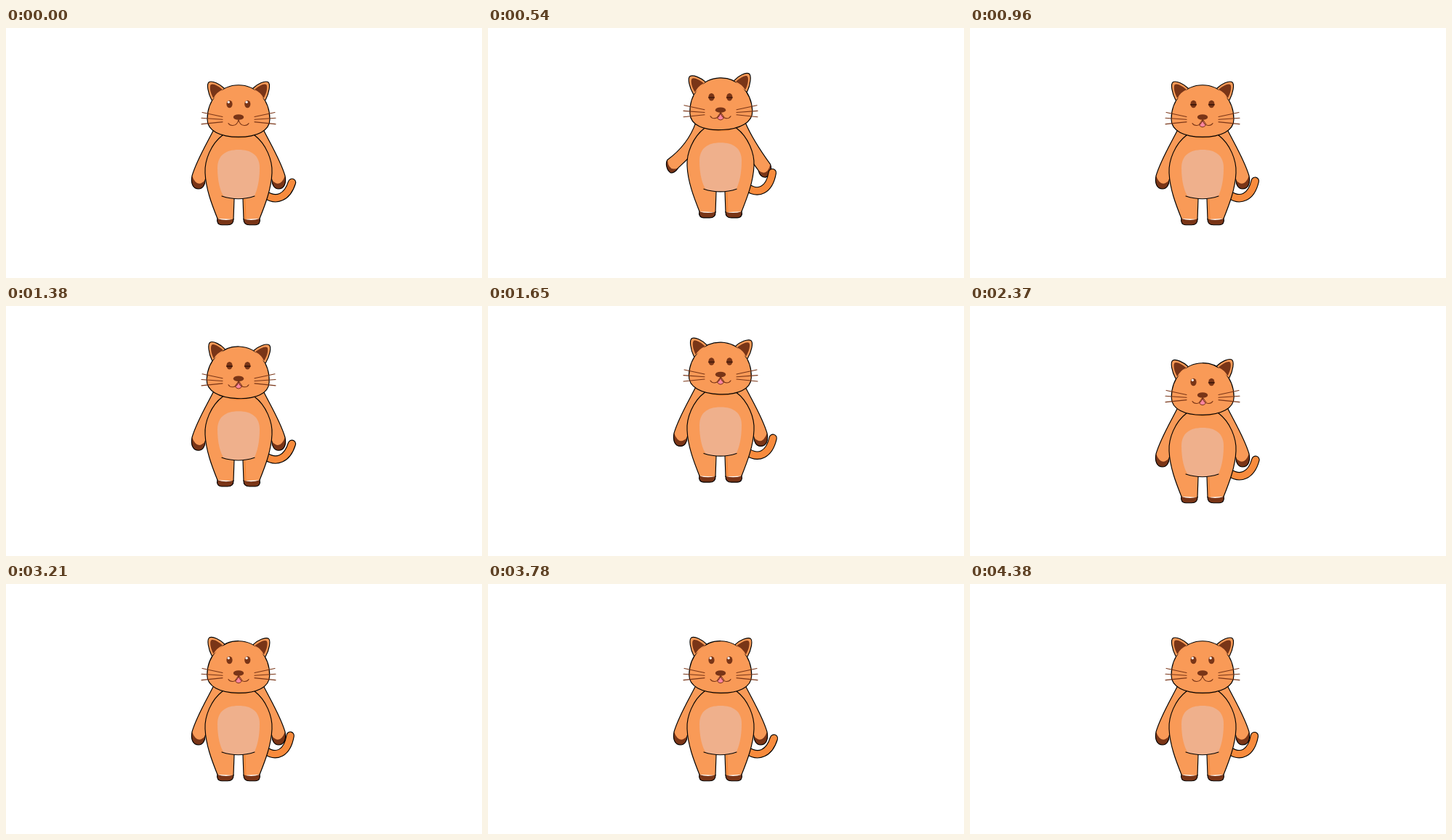
Recreate the animation shown at these times as an HTML page with a canvas. Size 655x345 px, loop 4.5 s.

```html
<!DOCTYPE html>
<html lang="en">
<head>
<meta charset="utf-8">
<title>Hopping cat</title>
<style>
  html, body { margin: 0; width: 100%; height: 100%; overflow: hidden; background: #fff; }
  canvas { display: block; }
</style>
</head>
<body>
<canvas id="stage" width="655" height="345"></canvas>
<script>
const ctx = document.getElementById('stage').getContext('2d');
const LOOP = 4500, STEP = 30, LAST = 4380, AXIS = 320, HEAD_Y = 108;
const FUR = '#f99a57', SHADE = '#f88b3d', BROWN = '#793517', BELLY = '#efb08c', INK = '#000';

const ARM_DOWN = [286,140, 276,160, 262,183, 256,204, 254,214, 257,222, 265,222,
                  271,222, 274,216, 274,210, 278,196, 296,170, 302,138, 263,222];
const ARM_OUT  = [286,140, 279,160, 266,178, 247,192, 244,197, 246,207, 252,210,
                  257,210, 260,206, 262,203, 280,186, 296,172, 302,138, 249,209];
const TAIL_LOW  = [357,230, 372,240, 387,234, 393.5,213.2];
const TAIL_HIGH = [357,230, 372,240, 387,234, 391.2,209.2];

const mix = (a, b, k) => a.map((v, i) => v + (b[i] - v) * k);

// smooth rise and fall between start and start + length
function bump(t, start, length) {
  const p = (t - start) / length;
  return p > 0 && p < 1 ? Math.sin(Math.PI * p) ** 2 : 0;
}

function sway(t, start, period) {
  const p = (t - start) / period;
  return p > 0 && p < 1 ? -Math.sin(2 * Math.PI * p) : 0;
}

function draw(d, fill, stroke, width = 1.15) {
  const path = new Path2D(d);
  if (fill) { ctx.fillStyle = fill; ctx.fill(path); }
  if (stroke) { ctx.strokeStyle = stroke; ctx.lineWidth = width; ctx.stroke(path); }
}

function oval(x, y, rx, ry, fill) {
  ctx.beginPath();
  ctx.ellipse(x, y, rx, ry, 0, 0, 7);
  ctx.fillStyle = fill;
  ctx.fill();
}

function mirrored(paint) {
  ctx.save();
  ctx.translate(2 * AXIS, 0);
  ctx.scale(-1, 1);
  paint();
  ctx.restore();
}

function arm(k) {
  const p = mix(ARM_DOWN, ARM_OUT, k), at = (from, to) => p.slice(from, to).join(' ');
  const hand = `C${at(8, 14)} C${at(14, 20)}`;
  const outline = `M${at(0, 2)} C${at(2, 8)} ${hand} C${at(20, 26)}`;
  draw(outline, FUR);
  draw(`M${at(6, 8)} ${hand} Q${at(26, 28)} ${at(6, 8)}`, BROWN);
  draw(outline, null, INK);
}

function tail(k) {
  const p = mix(TAIL_LOW, TAIL_HIGH, k);
  const d = `M${p.slice(0, 2)} C${p.slice(2)}`;
  draw(d, null, INK, 11.4);
  draw(d, null, SHADE, 9.2);
}

function foot() {
  const sole = 'M291 263 C289.5 268 292 271.7 297 271.7 L305 271.7 C310.5 271.7 313.3 269 313 263.5';
  draw(sole + ' Q302 266.5 291 263Z', BROWN);
  draw(sole, null, INK);
}

function body() {
  const side = 'M298 148 C282 160 273 183 274 200 C275 222 283 243 291 263';
  const inner = 'M313 264 L314 235.5';
  draw('M298 148 C282 160 273 183 274 200 C275 222 283 243 291 263 L313 264 L314 235.5 ' +
       'L326 235.5 L327 264 L349 263 C357 243 365 222 366 200 C367 183 358 160 342 148Z', FUR);
  draw('M328.5 237 L329.5 263', null, SHADE, 2);
  const half = () => { foot(); draw(side + inner, null, INK); };
  half();
  mirrored(half);
  draw('M320 168 C302 168 291 176 291 193 C291 212 295 226 300 233 Q320 238 341 233 ' +
       'C346 224 349 210 349 193 C349 176 338 168 320 168Z', BELLY);
  draw('M297 232 Q320 239.5 342 232', null, INK);
  draw('M302 149 Q320 156 340 149Z', SHADE);
}

function ear() {
  const rim = 'M283 99.5 C278 90 275.5 77 279.5 74.5 C284 72.5 294 77 300 83';
  draw(rim + ' Q293 92 283 99.5', FUR);
  draw('M285.5 97 C281 90 279.5 80 282 78 C285 76 292 80 298 85 Q289 89 285.5 97Z', BROWN);
  draw(rim, null, INK);
}

function head(degrees) {
  ctx.save();
  ctx.translate(AXIS, HEAD_Y);
  ctx.rotate(degrees * Math.PI / 180);
  ctx.translate(-AXIS, -HEAD_Y);
  draw('M320 78.7 C296 78.7 277 99 277 126 C277 142 295 150.4 320 150.4 ' +
       'C345 150.4 363 142 363 126 C363 99 344 78.7 320 78.7Z', FUR, INK);
  ear();
  mirrored(ear);
  ctx.restore();
}

function eye(x, closed) {
  oval(x, 105, 4.1, 5.3, BROWN);
  if (closed) draw(`M${x - 4} 105.8 h8`, null, '#2a0d04');
  else oval(x - 1.2, 102.3, 1.6, 1.7, '#fff');
}

function whiskers() {
  draw('M270 116.5 L298 122.5 M269 124.2 L298 126.3 M269 132.6 L298 129.6', null, BROWN, 1.1);
}

function face(leftClosed, rightClosed, tongue) {
  eye(307.5, leftClosed);
  eye(332.3, rightClosed);
  whiskers();
  mirrored(whiskers);
  if (tongue) draw('M320 126.5 L315.2 133.2 Q316.8 136.8 320 136.8 Q323.2 136.8 324.8 133.2Z', '#ff86a0', BROWN, 1);
  draw('M306 131.5 Q308 134.8 312 134.5 Q318.5 134 320 126.5 Q321.5 134 328 134.5 Q332 134.8 334 131.5', null, BROWN);
  oval(320, 123, 7.2, 3.8, BROWN);
}

function render(now) {
  const t = Math.min(LAST, Math.floor(now % LOOP / STEP) * STEP);
  const hop = 14.5 * bump(t, 0, 780) + 32 * bump(t, 1080, 940);
  const wave = 1.4 * (bump(t, 0, 800) + bump(t, 2580, 620));
  const tilt = 2.7 * sway(t, 0, 1920) + 2 * sway(t, 2280, 1620);

  ctx.fillStyle = '#fff';
  ctx.fillRect(0, 0, 655, 345);
  ctx.save();
  ctx.translate(0, -hop);
  ctx.lineCap = ctx.lineJoin = 'round';
  arm(wave);
  mirrored(() => arm(wave / 2));
  tail((1 - Math.cos(2 * Math.PI * t / 1290)) / 2);
  body();
  head(tilt);
  face(t >= 270 && t < 2340, t >= 270 && t < 2430, t >= 270 && t < 3900);
  ctx.restore();
}

let begin;
function tick(now) {
  begin ??= now;
  render(now - begin);
  requestAnimationFrame(tick);
}
render(0);
requestAnimationFrame(tick);
</script>
</body>
</html>
```
